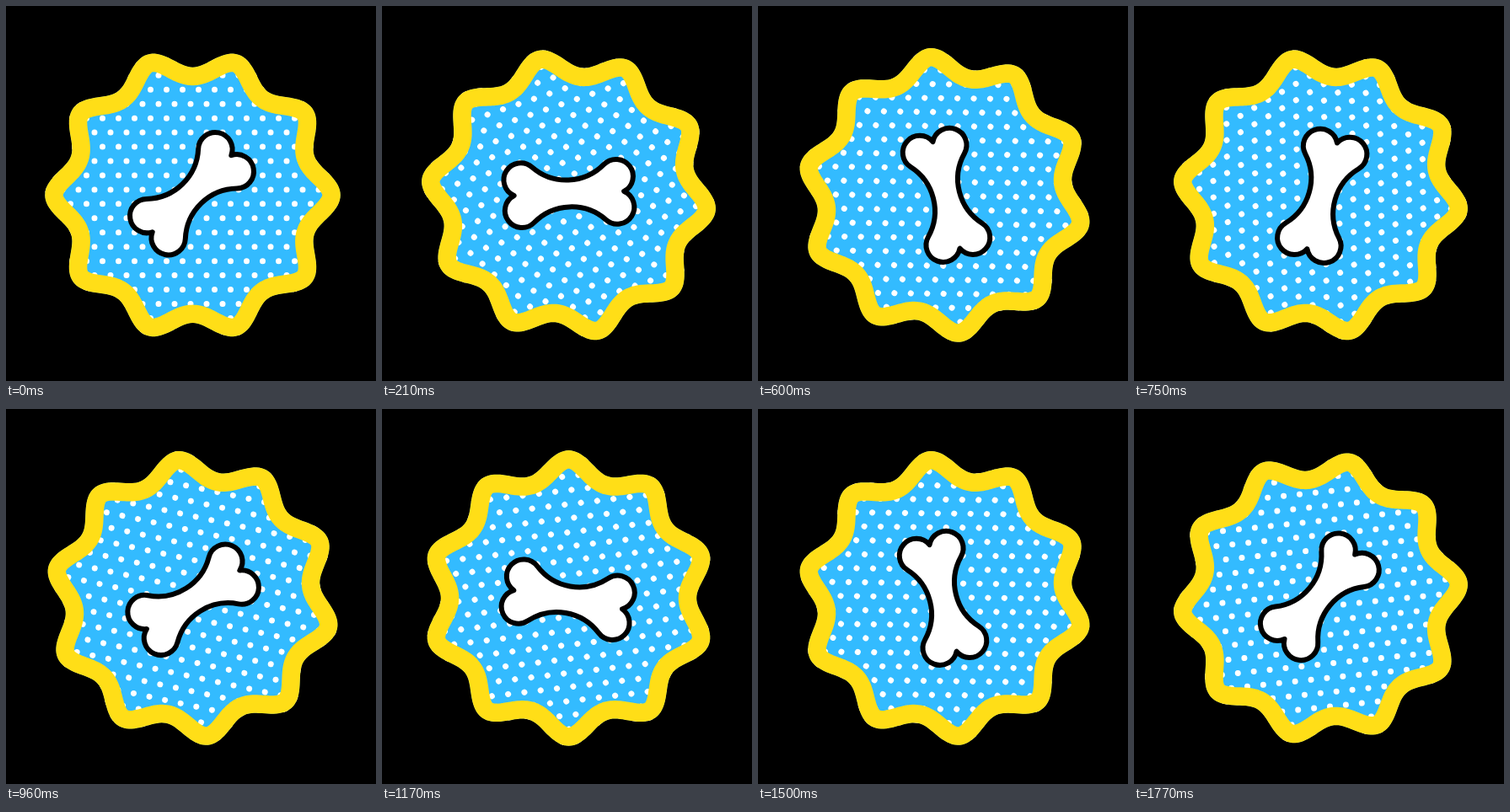
Recreate the animation shown at these times as an HTML page with a canvas. Size 439 by 445 pixels, loop 1.8 s.

```html
<!DOCTYPE html>
<html lang="en">
<head>
<meta charset="utf-8">
<title>Spinning bone badge</title>
<style>
  html, body { margin: 0; height: 100%; overflow: hidden; background: #000; }
  canvas { display: block; }
</style>
</head>
<body>
<canvas id="stage" width="439" height="445"></canvas>
<script>
const ctx = document.getElementById('stage').getContext('2d');
const LOOP = 1800, STEP = 30, TAU = 2 * Math.PI;
const CENTER = [221.5, 224.4];
const RIM = 21.5;

// Ten-lobed wavy disc
function wavyDisc() {
  const path = new Path2D();
  for (let deg = 0; deg < 360; deg++) {
    const a = deg * TAU / 360;
    const r = 163.5 + 11.8 * Math.cos(10 * a);
    path.lineTo(r * Math.cos(a), r * Math.sin(a));
  }
  path.closePath();
  return path;
}

// Staggered rows of dots covering the disc
function dotGrid(dx, dy, x0, y0, radius) {
  const path = new Path2D();
  for (let row = -10; row <= 10; row++) {
    for (let col = -10; col <= 10; col++) {
      const x = x0 + (col + Math.abs(row % 2) / 2) * dx, y = y0 + row * dy;
      path.moveTo(x + radius, y);
      path.arc(x, y, radius, 0, TAU);
    }
  }
  return path;
}

const disc = wavyDisc();
const dots = dotGrid(19, 16.95, -2.5, -6.5, 3.5);
const bone = new Path2D(`M-42.7-32.9 A62.25 62.25 0 0 0 42.7-32.9
  A20.2 20.2 0 1 1 65.3 0 A20.2 20.2 0 1 1 42.7 32.9
  A62.25 62.25 0 0 0 -42.7 32.9
  A20.2 20.2 0 1 1 -65.3 0 A20.2 20.2 0 1 1 -42.7-32.9Z`);

function fill(path, color) {
  ctx.fillStyle = color;
  ctx.fill(path);
}

function stroke(path, color, width) {
  ctx.strokeStyle = color;
  ctx.lineWidth = width;
  ctx.stroke(path);
}

function draw(time) {
  const turn = Math.floor(time % LOOP / STEP) * STEP / LOOP * TAU;
  ctx.clearRect(0, 0, 439, 445);
  ctx.lineJoin = 'round';
  ctx.save();
  ctx.translate(...CENTER);
  ctx.rotate(turn);

  // The clip keeps only the inner half of the rim stroke
  ctx.save();
  ctx.clip(disc);
  fill(disc, '#33bbff');
  fill(dots, '#fff');
  stroke(disc, '#ffde17', 2 * RIM);
  ctx.restore();

  ctx.translate(-1, -1.7);
  ctx.rotate(-44.2 * TAU / 360);
  fill(bone, '#fff');
  stroke(bone, '#000', 6);
  ctx.restore();
}

const start = performance.now();
function tick() {
  draw(performance.now() - start);
  requestAnimationFrame(tick);
}
tick();
</script>
</body>
</html>
```
